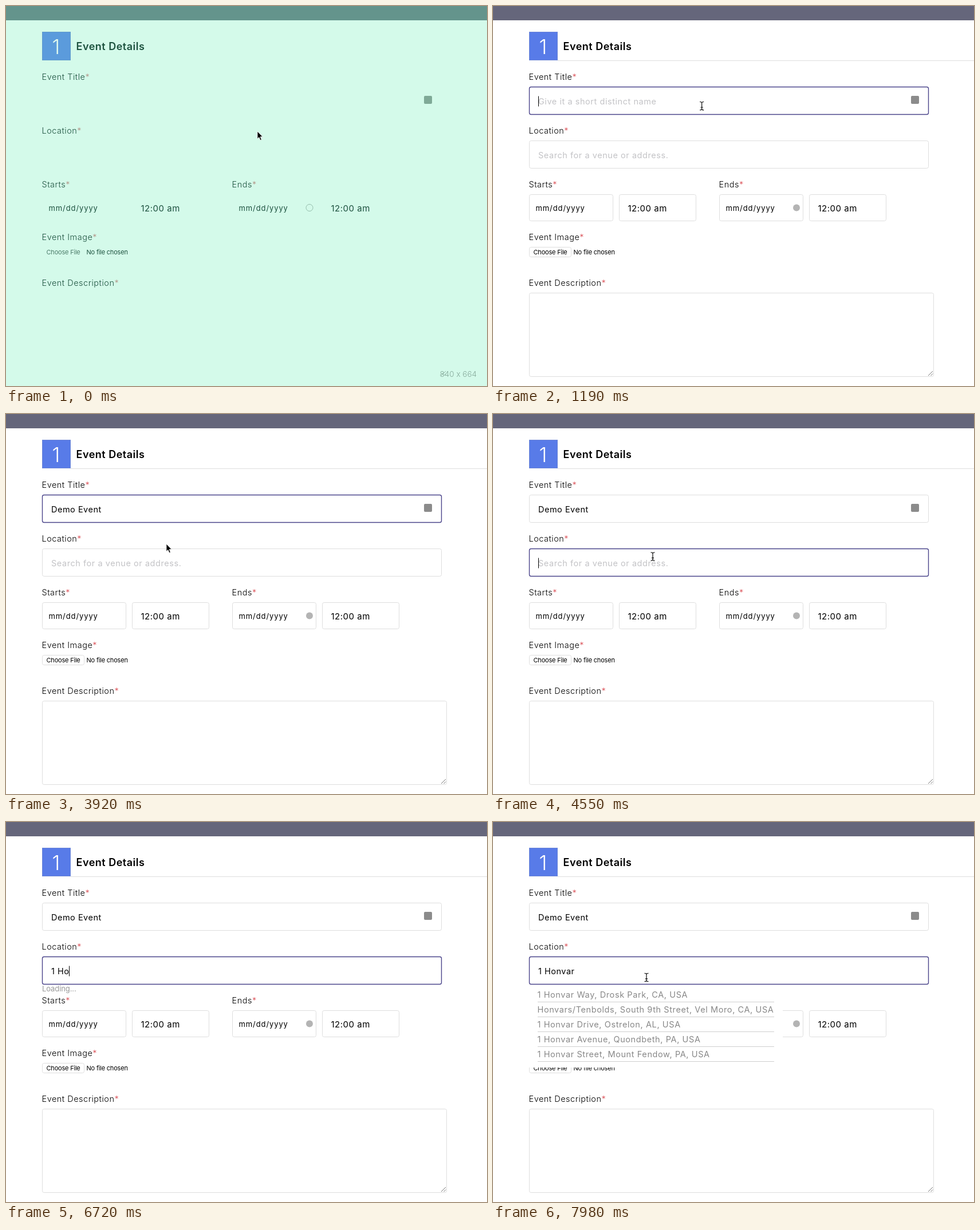
An HTML page that plays this animation: 840x664 px, repeating every 8000 ms.

```html
<!DOCTYPE html>
<html lang="en">
<head>
<meta charset="utf-8">
<title>Event form</title>
<style>
  html, body { margin: 0; width: 100%; height: 100%; overflow: hidden; background: #fff; }
  svg { display: block; width: 840px; height: 664px; background: #fff; }
  text { font: 14.5px Inter, "Open Sans", sans-serif; letter-spacing: .5px; white-space: pre; fill: #000; }
  .label { font-weight: 300; fill: #000; }
  .star { fill: #d9484f; }
  .head { font-size: 18px; font-weight: 600; letter-spacing: .5px; }
  .num { font-size: 35px; font-weight: 300; letter-spacing: 0; fill: #fff; text-anchor: middle; }
  .date { font-size: 13px; letter-spacing: .9px; }
  .time { font-size: 15px; }
  .small { font-size: 11px; letter-spacing: -.2px; }
  .hint { letter-spacing: .55px; fill: #c3c3c6; }
  .load { font-size: 13px; letter-spacing: -.1px; fill: #999; }
  .row { letter-spacing: .6px; fill: #888; }
  .size { font-size: 13.5px; font-weight: 300; letter-spacing: 0; display: none; }
  .bar { fill: #65667b; }
  .badge { fill: #587be8; stroke: #6c86d6; }
  .field { fill: #fff; stroke: #dedede; }
  .rule { stroke: #dedede; }
  .icon { fill: #8b8b8b; }
  .dot { fill: #b4b4b4; }
  .grip { stroke: #777; fill: none; }

  .tint { background: #d4faea; }
  .tint text { fill: #1d523f; }
  .tint .label { fill: #1d523f; }
  .tint .star { fill: #b08e82; }
  .tint .num { fill: #e2fbee; }
  .tint .bar { fill: #64948c; stroke: #4f9380; }
  .tint .badge { fill: #5b9bdc; stroke: #5f9bcb; }
  .tint .field, .tint .rule, .tint .hint { visibility: hidden; }
  .tint .icon { fill: #7fa997; }
  .tint .dot { fill: none; stroke: #94bdac; }
  .tint .grip { stroke: #8fb5a5; }
  .tint .button { fill: #4d7d6b; }
  .tint .size { display: block; fill: #86aa9b; }
</style>
</head>
<body>
<svg id="stage" viewBox="0 0 840 664"></svg>
<script>
const stage = document.getElementById('stage');
const text = (x, y, s, cls = '', id = '') => `<text x="${x}" y="${y}" class="${cls}" id="${id}">${s}</text>`;
const label = (x, y, s) => text(x, y, s + '<tspan class="star">*</tspan>', 'label');
const field = (x, y, w, h, id = '') =>
  `<rect x="${x + .5}" y="${y + .5}" width="${w}" height="${h}" rx="3" class="field" id="${id}"/>`;

stage.innerHTML = `
  <rect class="bar" x=".5" y=".5" width="839" height="24"/>
  <rect class="bar" width="840" height="25" style="stroke:none"/>
  <path class="rule" d="M113 95.5H840"/>
  <rect class="badge" x="63.5" y="45.5" width="49" height="49"/>
  ${text(87.5, 84, '1', 'num')}
  ${text(122.5, 77, 'Event Details', 'head')}
  ${label(62.5, 129, 'Event Title')}
  ${field(63, 141, 697, 48, 'titleBox')}
  ${text(79, 172, 'Give it a short distinct name', 'hint', 'titleHint')}
  ${text(79, 172, '', '', 'title')}
  <rect class="icon" x="730" y="157" width="14" height="14" rx="2"/>
  ${label(62.5, 223, 'Location')}
  ${field(63, 235, 697, 48, 'placeBox')}
  ${text(79, 266, 'Search for a venue or address.', 'hint', 'placeHint')}
  ${text(79, 266, '', '', 'place')}
  ${[['Starts', 63], ['Ends', 395]].map(([name, x]) =>
    label(x - .5, 317, name) + field(x, 329, 146, 46) + field(x + 157, 329, 134, 46) +
    text(x + 11.5, 358, 'mm/dd/yyyy', 'date') + text(x + 172.5, 359, '12:00 am', 'time')).join('')}
  <circle class="dot" cx="530" cy="352.5" r="6"/>
  ${label(62.5, 409, 'Event Image')}
  ${field(63, 421, 73, 17)}
  ${text(70.5, 434, 'Choose File', 'small button')}
  ${text(140.5, 434, 'No file chosen', 'small')}
  ${label(62.5, 489, 'Event Description')}
  ${field(63, 501, 706, 146)}
  <path class="grip" d="M760 646l8-8M764.5 646l3.5-3.5"/>
  ${text(757.5, 648, '840 x 664', 'size')}
  ${text(63, 296, 'Loading...', 'load', 'loading')}
  <g id="menu"></g>
  <path id="caret" stroke="#000" d="M.5 0V18"/>
  <path id="arrow" fill="#000" stroke="#fff" stroke-width=".8"
    d="M0 0V13.2L3 10.4L5 15.6L7.3 14.7L5.2 9.6H9.2Z"/>
  <path id="beam" fill="none" stroke="#222" stroke-width="1.3"
    d="M-3.5 -7.2Q0 -7.2 0 -5.2V5.2Q0 7.2 -3.5 7.2M3.5 -7.2Q0 -7.2 0 -5.2M3.5 7.2Q0 7.2 0 5.2M-2 2.5H2"/>`;

const el = {};
for (const node of stage.querySelectorAll('[id]')) if (node.id) el[node.id] = node;

const titleKeys = [1960, 2170, 2240, 2310, 2450, 2590, 2800, 2870, 2940, 3010];
const placeKeys = [5600, 5670, 6370, 6720, 6790, 6860, 6930, 7000];
const caretOn = [[1190, 1680], [1960, 3500], [4550, 5110], [5600, 6160], [6370, 7490]];
const loadingOn = [[6020, 6230], [6720, 6930], [7350, 7560]];
const mouseOn = [[0, 1960], [3570, 5530], [7840, 8000]];
const path = [
  [70, 439, 219], [210, 432, 214], [630, 376, 178], [840, 369, 173], [3570, 335, 186],
  [3920, 280, 227], [4270, 279, 249], [4620, 279, 249], [4690, 277, 254],
  [7840, 277, 254], [7910, 274, 262], [7980, 268, 271.5]
];
const menus = [
  [6230, 6720, ['1 Tervane Way, Ostlin Park, CA, USA', '1 Colvane Boulevard, Lower Brendith, TX, USA',
    '1 Plessor Drive, Marvelin, OH, USA', '1 Dunvik Avenue, Quillbeth, PA, USA', '1 Wexlow Street, Tarnby, NY, USA']],
  [6930, 7350, ['1 Hestrin Way, Ostlin Park, CA, USA', '1 Harlune Boulevard, North Brendith, TX, USA',
    '1 Hulvane Drive, Marvelin, AL, USA', '1 Hobrick Avenue, Quillbeth, PA, USA', '1 Hintel Street, Tarnby, NY, USA']],
  [7560, 8000, ['1 Honvar Way, Drosk Park, CA, USA', 'Honvars/Tenbolds, South 9th Street, Vel Moro, CA, USA',
    '1 Honvar Drive, Ostrelon, AL, USA', '1 Honvar Avenue, Quondbeth, PA, USA', '1 Honvar Street, Mount Fendow, PA, USA']]
];

const clamp = v => Math.max(0, Math.min(1, v));
const within = (spans, t) => spans.some(([a, b]) => t >= a && t < b);
const typed = (s, keys, t) => s.slice(0, keys.filter(k => k <= t).length);
const show = (node, on) => { node.style.display = on ? '' : 'none'; };
const move = (node, x, y) => node.setAttribute('transform', `translate(${x} ${y})`);
const mix = (a, b, p) => `rgb(${a.map((v, i) => Math.round(v + (b[i] - v) * p))})`;

function focus(box, p) {
  box.style.stroke = mix([222, 222, 222], [74, 68, 138], p);
  box.style.strokeWidth = 1 + .4 * p;
}

function mouseAt(t) {
  if (t <= path[0][0]) return path[0].slice(1);
  const i = path.findIndex(p => p[0] >= t);
  if (i < 0) return path[path.length - 1].slice(1);
  const [t0, x0, y0] = path[i - 1], [t1, x1, y1] = path[i];
  const p = (t - t0) / (t1 - t0);
  return [x0 + (x1 - x0) * p, y0 + (y1 - y0) * p];
}

let openMenu;
function drawMenu(menu) {
  if (menu === openMenu) return;
  openMenu = menu;
  if (!menu) { el.menu.innerHTML = ''; return; }
  const rows = menu[2].map((s, i) => text(77.5, 307 + 26 * i, s, 'row')).join('');
  el.menu.innerHTML = rows;
  const width = Math.round(Math.max(...[...el.menu.children].map(n => n.getComputedTextLength())));
  const lines = menu[2].map((s, i) => `M78 ${314.5 + 26 * i}h${width}`).join('');
  el.menu.innerHTML = `<rect x="63" y="285" width="${width + 30}" height="144" fill="#fff"/>
    ${rows}<path stroke="#cfcfcf" d="${lines}"/>`;
}

function draw(t) {
  stage.classList.toggle('tint', t < 70);
  const title = typed('Demo Event', titleKeys, t), place = typed('1 Honvar', placeKeys, t);
  el.title.textContent = title;
  el.place.textContent = place;
  show(el.titleHint, !title);
  show(el.placeHint, !place);

  const swap = clamp((t - 4270) / 280);
  focus(el.titleBox, clamp((t - 840) / 350) * (1 - swap));
  focus(el.placeBox, swap);

  const [input, y] = t < 4340 ? [el.title, 157.5] : [el.place, 251.5];
  show(el.caret, within(caretOn, t));
  move(el.caret, Math.round(79 + (input.textContent ? input.getComputedTextLength() : 0)), y);

  show(el.loading, within(loadingOn, t));
  drawMenu(menus.find(([a, b]) => t >= a && t < b));

  const [mx, my] = mouseAt(t), visible = within(mouseOn, t);
  const overInput = my < 190 || my > 235;
  show(el.arrow, visible && !overInput);
  show(el.beam, visible && overInput);
  move(el.arrow, mx, my);
  move(el.beam, mx, my);
}

function tick() {
  // The screen refreshes every 70 ms.
  draw(Math.floor(performance.now() % 8000 / 70) * 70);
  requestAnimationFrame(tick);
}
tick();
</script>
</body>
</html>
```
